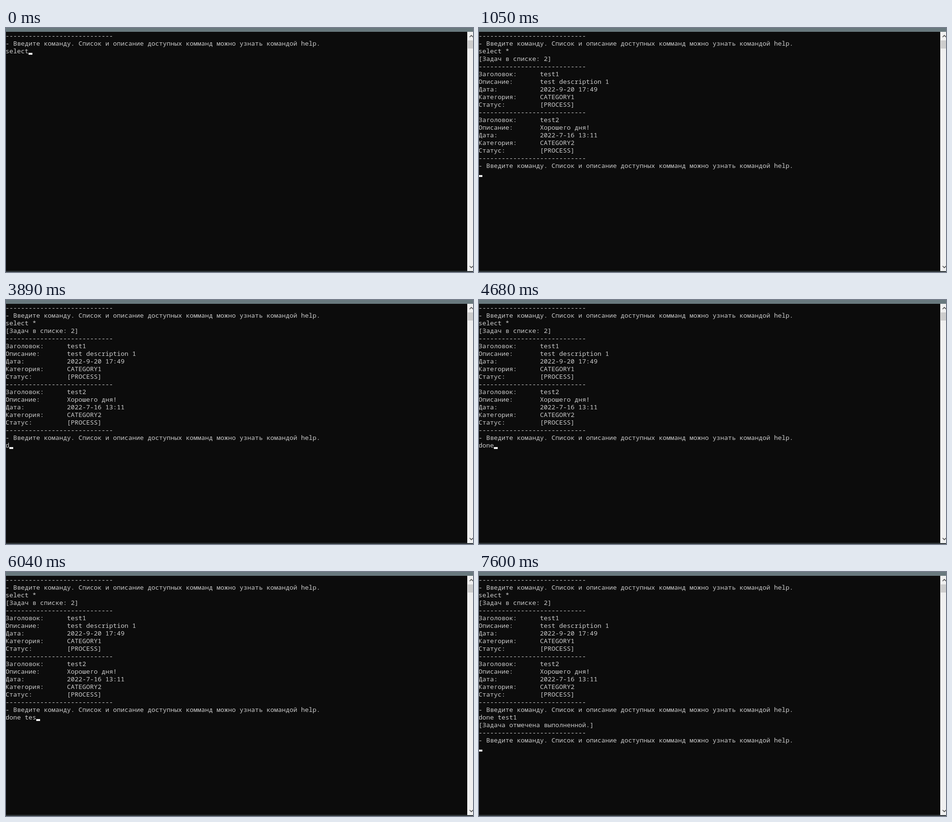
An HTML page that plays this animation: 973 by 511 pixels, repeating every 8000 ms.

```html
<!DOCTYPE html>
<html lang="ru">
<head>
<meta charset="utf-8">
<title>Консоль</title>
<style>
  html, body { margin: 0; width: 100%; height: 100%; overflow: hidden; background: #0c0c0c; }
  body { position: relative; }
  body > * { position: absolute; }
  #top { left: 0; top: 0; width: 100%; height: 8px; background: #69797e; }
  #base { left: 0; top: 509px; width: 100%; height: 1px; background: #56646a; }
  #out {
    left: -1px; top: 8px; margin: 0; color: #ccc; white-space: pre;
    font: 13.3333px/16px "Noto Sans Mono", "DejaVu Sans Mono", monospace;
    font-variant-ligatures: none;
  }
  #cur { width: 8px; height: 4px; background: #f2f2f2; }
  #bar { left: 961px; top: 8px; }
</style>
</head>
<body>
<div id="top"></div>
<pre id="out"></pre>
<div id="cur"></div>
<svg id="bar" width="12" height="501">
  <rect width="12" height="501" fill="#f0f0f0"/>
  <rect x="1" y="18" width="11" height="17" fill="#cdcdcd"/>
  <path d="M5 11l3.5-3.5L12 11M5 490.5l3.5 3.5L12 490.5" fill="none" stroke="#505050" stroke-width="1.7"/>
</svg>
<div id="base"></div>
<script>
const LOOP = 8000, CELL = 8, ROW = 16, TOP = 8;
const out = document.getElementById("out");
const cur = document.getElementById("cur");

const rule = "-".repeat(28);
const prompt = rule + "\n- Введите команду. Список и описание доступных комманд можно узнать командой help.\n";
const labels = ["Заголовок:", "Описание:", "Дата:", "Категория:", "Статус:"];
const task = (...vals) =>
  rule + "\n" + labels.map((l, i) => l.padEnd(16) + vals[i] + "\n").join("");

const listed = prompt + "select *\n[Задач в списке: 2]\n" +
  task("test1", "test description 1", "2022-9-20 17:49", "CATEGORY1", "[PROCESS]") +
  task("test2", "Хорошего дня!", "2022-7-16 13:11", "CATEGORY2", "[PROCESS]") +
  prompt;
const marked = listed + "done test1\n[Задача отмечена выполненной.]\n" + prompt;

// time, screen above the input, typed input, cursor visible
const steps = [
  [0, prompt, "select", 1],
  [90, prompt, "select ", 1],
  [270, prompt, "select ", 0],
  [440, prompt, "select *", 1],
  [810, prompt, "select *", 0],
  [1020, prompt, "select *\n", 1],
  [1050, listed, "", 1],
  [1850, listed, "", 0],
  [2370, listed, "", 1],
  [2910, listed, "", 0],
  [3430, listed, "", 1],
  [3890, listed, "d", 1],
  [3950, listed, "d", 0],
  [4100, listed, "do", 1],
  [4470, listed, "do", 0],
  [4530, listed, "don", 1],
  [4680, listed, "done", 1],
  [4990, listed, "done", 0],
  [5090, listed, "done ", 1],
  [5500, listed, "done ", 0],
  [5680, listed, "done t", 1],
  [5800, listed, "done te", 1],
  [6010, listed, "done te", 0],
  [6040, listed, "done tes", 1],
  [6220, listed, "done test", 1],
  [6520, listed, "done test", 0],
  [7060, listed, "done test", 1],
  [7120, listed, "done test1", 1],
  [7570, listed, "done test1", 0],
  [7600, marked, "", 1]
];

let shown;
function draw(now) {
  const t = now % LOOP;
  const step = steps.findLast(s => s[0] <= t) || steps[0];
  if (step !== shown) {
    shown = step;
    const text = step[1] + step[2];
    const rows = text.split("\n");
    out.textContent = text;
    cur.style.left = rows.at(-1).length * CELL - 1 + "px";
    cur.style.top = TOP + rows.length * ROW - 4 + "px";
    cur.style.visibility = step[3] ? "visible" : "hidden";
  }
}

const start = performance.now();
function tick() {
  draw(performance.now() - start);
  requestAnimationFrame(tick);
}
tick();
</script>
</body>
</html>
```
